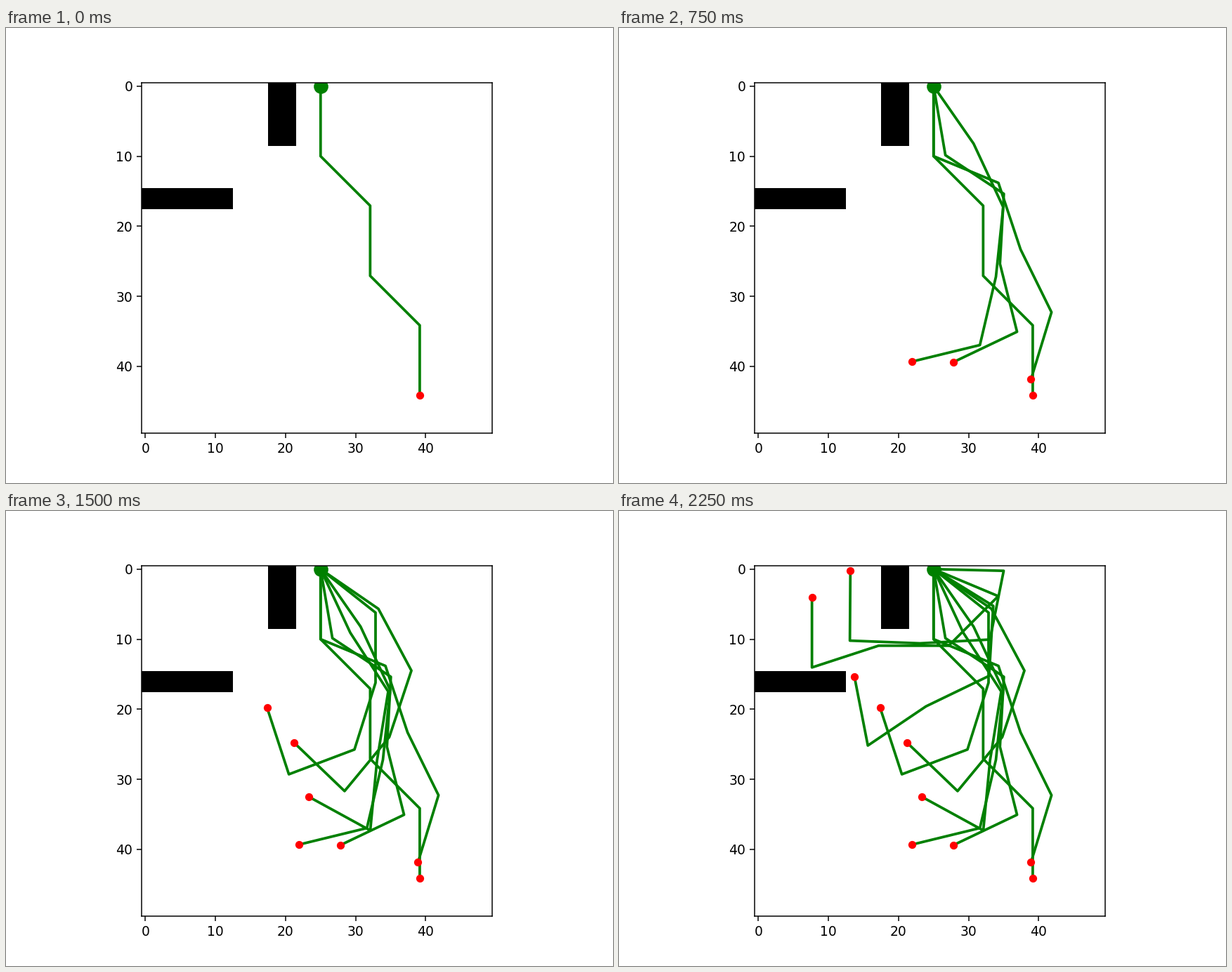
These frames come from a looping animation (864 by 648 pixels, 2500 ms). A matplotlib script:

```python
import numpy as np
import matplotlib.pyplot as plt
from matplotlib.animation import FuncAnimation

LINK = 10
BASE = (25, 0)
FRAME_MS = 250

# Link headings in degrees: 0 points down, positive turns to the right.
POSES = [
    (0, 45, 0, 45, 0),
    (0, 67.6, 18.4, 26.2, -17),
    (9.7, 56.5, -3.2, 14.1, -64.5),
    (34.8, 25, -6, -13.2, -76.3),
    (25, 32.8, -9.2, -5.5, -118.7),
    (55.5, 28.1, -18.4, -39.6, -133.8),
    (51.6, 0, -17.5, -69.3, -161.9),
    (58.3, -3.4, -64.2, -56, -169),
    (88.6, -11.3, -86.9, -92.2, 179.6),
    (67.3, -45, -90, -71.9, 180),
]


def joints(headings):
    a = np.radians(headings)
    x = BASE[0] + LINK * np.cumsum(np.sin(a))
    y = BASE[1] + LINK * np.cumsum(np.cos(a))
    return np.r_[BASE[0], x], np.r_[BASE[1], y]


def draw_arm(ax, headings):
    x, y = joints(headings)
    links, = ax.plot(x, y, color="green", lw=2)
    tip, = ax.plot(x[-1:], y[-1:], "o", color="red", ms=5)
    return links, tip


grid = np.zeros((50, 50))
grid[0:9, 18:22] = 1
grid[15:18, 0:13] = 1

fig, ax = plt.subplots(figsize=(6.4, 4.8), dpi=135)
ax.imshow(grid, cmap="binary", interpolation="nearest")
ax.set_autoscale_on(False)
ax.plot(*BASE, "o", color="green", ms=10)
arms = [draw_arm(ax, pose) for pose in POSES]


def update(frame):
    for i, arm in enumerate(arms):
        for artist in arm:
            artist.set_visible(i <= frame)
    return [artist for arm in arms for artist in arm]


anim = FuncAnimation(fig, update, frames=len(POSES), init_func=lambda: update(0),
                     interval=FRAME_MS, repeat=True, repeat_delay=0)
plt.show()
```
